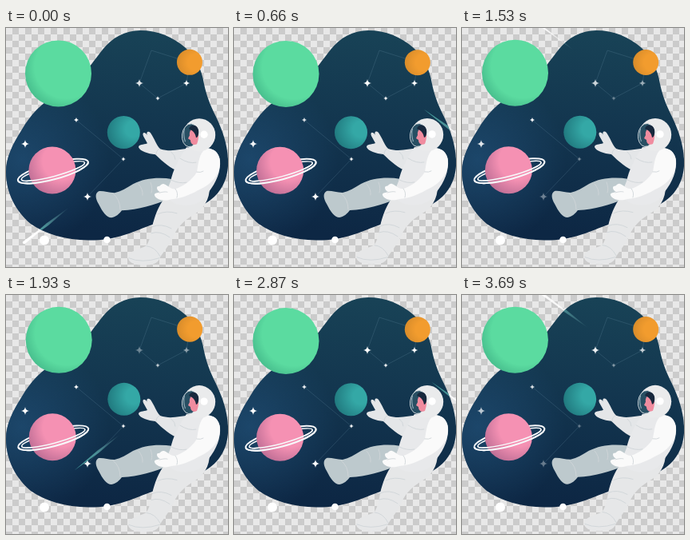
Animation of 278x299 px, one loop 3.76 s. Source, as an HTML page:

```html
<!DOCTYPE html>
<html lang="en">
<head>
<meta charset="utf-8">
<title>Floating astronaut</title>
<style>
html, body { margin: 0; width: 100%; height: 100%; overflow: hidden; }
body { background: repeating-conic-gradient(#cbcbcb 0 25%, #e8e8e8 0 50%) 0 0 / 16px 16px; }
svg { display: block; width: 278px; height: 299px; }
.fold { fill: none; stroke: #d0d5d9; stroke-width: .9; stroke-linecap: round; }
.ring { fill: none; stroke: #f7f8fa; }
.lines { fill: none; stroke: #7fa6bd; stroke-width: .6; opacity: .32; }
</style>
</head>
<body>
<svg viewBox="0 0 278 299">
  <defs>
    <path id="blob" d="M168 3C149 3 133 12 121 27C106 46 94 66 67 81C44 94 31 108 20 127C8 146 0 162 0 180C0 206 12 229 31 245C49 258 75 265 103 265.5C134 266 152 258 175 249C208 237 243 228 261 211C274 198 279 182 278 164C277 144 271 128 263 111C255 95 251 84 248 70C245 51 237 36 225 25C209 11 190 3 168 3Z"/>
    <clipPath id="inside"><use href="#blob"/></clipPath>
    <linearGradient id="night" gradientUnits="userSpaceOnUse" x1="190" y1="10" x2="160" y2="262">
      <stop offset="0" stop-color="#184256"/>
      <stop offset=".45" stop-color="#13364f"/>
      <stop offset="1" stop-color="#0d2744"/>
    </linearGradient>
    <radialGradient id="haze" gradientUnits="userSpaceOnUse" cx="20" cy="165" r="110">
      <stop offset="0" stop-color="#1f4c72" stop-opacity=".8"/>
      <stop offset="1" stop-color="#1f4c72" stop-opacity="0"/>
    </radialGradient>
    <radialGradient id="green" cx=".62" cy=".4" r=".68">
      <stop offset=".7" stop-color="#5bdba0"/><stop offset="1" stop-color="#45bb8b"/>
    </radialGradient>
    <radialGradient id="teal" cx=".8" cy=".4" r=".8">
      <stop offset=".3" stop-color="#34a8a6"/><stop offset="1" stop-color="#217b80"/>
    </radialGradient>
    <radialGradient id="pink" cx=".7" cy=".3" r=".8">
      <stop offset=".5" stop-color="#f591b3"/><stop offset="1" stop-color="#bd6d94"/>
    </radialGradient>
    <radialGradient id="orange" cx=".75" cy=".5" r=".8">
      <stop offset=".4" stop-color="#f29c2e"/><stop offset="1" stop-color="#d58a2a"/>
    </radialGradient>
    <linearGradient id="tealTail">
      <stop offset="0" stop-color="#3f9c9a"/>
      <stop offset=".45" stop-color="#5aa9a9" stop-opacity=".8"/>
      <stop offset="1" stop-color="#7fb9bc" stop-opacity="0"/>
    </linearGradient>
    <linearGradient id="whiteTail">
      <stop offset="0" stop-color="#fff"/>
      <stop offset=".5" stop-color="#fff" stop-opacity=".9"/>
      <stop offset="1" stop-color="#fff" stop-opacity="0"/>
    </linearGradient>
    <path id="glow" d="M0 0L40 -1.7L77 0L40 1.7Z" fill="url(#tealTail)"/>
    <path id="streak" d="M0 -1.8L77 0L0 1.8Q-2 0 0 -1.8Z" fill="url(#whiteTail)"/>
    <path id="star" d="M0 -5Q.6 -.6 5 0Q.6 .6 0 5Q-.6 .6 -5 0Q-.6 -.6 0 -5Z" fill="#fff"/>
  </defs>

  <use class="rise" href="#streak"/>
  <use class="fall" href="#streak"/>
  <use href="#blob" fill="url(#night)"/>
  <use href="#blob" fill="url(#haze)"/>
  <circle cx="48" cy="265.5" r="6" fill="#fff"/>
  <circle cx="126.5" cy="265" r="4.3" fill="#fff"/>

  <g class="lines">
    <path d="M167 69L182 28L230 43L226 69L190 88Z"/>
    <path d="M88 115L147 164L102 211"/>
  </g>
  <g id="stars"></g>
  <g clip-path="url(#inside)">
    <use class="rise" href="#glow"/>
    <use class="fall" href="#glow"/>
  </g>

  <circle id="big" cx="65.7" cy="56.8" r="41.5" fill="url(#green)"/>
  <circle id="amber" cx="230" cy="43" r="16" fill="url(#orange)"/>
  <circle id="mid" cx="147.2" cy="130.5" r="20.5" fill="url(#teal)"/>
  <g id="ringed">
    <g class="ring" transform="translate(59 179) rotate(-15)">
      <ellipse rx="45.5" ry="10.3" stroke-width="2"/>
      <ellipse rx="41" ry="6.6" stroke-width="1.5"/>
    </g>
    <circle cx="58" cy="178" r="29.5" fill="url(#pink)"/>
    <g class="ring" transform="translate(59 179) rotate(-15)">
      <path d="M-45.5 0A45.5 10.3 0 0 0 45.5 0" stroke-width="2"/>
      <path d="M-41 0A41 6.6 0 0 0 41 0" stroke-width="1.5"/>
    </g>
  </g>

  <g id="astronaut">
    <path d="M209 189C190 186 173 188 159 195C151 200 144 204 136 206C128 206 121 203 116 204C111 207 112 213 116 220C121 230 126 237 132 237C138 236 142 232 145 228C166 227 186 221 203 214Z" fill="#bdc9cd"/>
    <path class="fold" d="M134 207Q143 214 143 227M166 195Q172 202 171 209M181 193Q184 201 182 206" stroke="#a5b4bb"/>
    <path d="M232 151C220 150 208 156 193 151C188 146 186 138 181 131C178 128 175 130 177 134C174 129 170 130 172 135L177 144C172 146 166 145 166 149C168 154 178 157 187 158C196 167 207 176 216 179L232 174Z" fill="#e4e6e8"/>
    <path class="fold" d="M192 151Q188 153 188 158M207 155Q212 159 212 164"/>
    <g id="leg">
      <path d="M199 212C191 221 186 235 183 248C181 260 179 268 175 272C167 276 155 278 153 285C152 292 160 296 172 296C185 296 191 293 193 286C199 277 205 270 209 261C214 249 222 241 233 234C248 226 255 214 255 198Z" fill="#e6e7e8"/>
      <path class="fold" d="M176 272Q187 273 193 285M183 248Q194 243 207 250M182 256Q192 252 205 261M190 232Q201 227 214 231M154 287Q170 294 192 287"/>
    </g>
    <path d="M226 149C216 163 209 178 206 192C201 203 199 212 209 218C224 226 246 221 253 206C264 192 269 179 268 165C266 153 255 148 245 150Z" fill="#e8e9eb"/>
    <path class="fold" d="M218 163Q229 170 238 168M207 190Q217 195 226 193"/>
    <path d="M250 151C262 149 269 158 268 171C266 187 254 197 240 203C230 209 218 213 207 214C199 217 188 215 186 209C185 206 190 206 193 205C189 203 188 199 190 198C194 198 194 194 198 195C203 197 207 202 212 201C222 198 233 190 239 180C241 168 242 156 250 151Z" fill="#fafafa"/>
    <path class="fold" d="M212 201Q216 206 214 212M192 206Q199 204 202 205M239 180Q244 181 247 179"/>
    <ellipse cx="242" cy="133.5" rx="20.2" ry="20.5" fill="#eaebec"/>
    <ellipse cx="230.5" cy="134" rx="10" ry="14.5" transform="rotate(7 230.5 134)" fill="#284f63" stroke="#e6eaec" stroke-width=".8"/>
    <path d="M238 123C233 124 229 129 230 134L228 138L231 140C231 145 235 147 239 145C242 138 242 129 238 123Z" fill="#f08c9f"/>
    <path d="M229 126C231 120 239 120 241 127C242 133 240 137 238 137C237 131 234 128 229 126Z" fill="#17283d"/>
    <path d="M223.500 126Q221.500 134 224.500 142" fill="none" stroke="#8ea8b6" stroke-width="1.2"/>
    <circle cx="248" cy="133" r="4.7" fill="#fff"/>
  </g>
</svg>
<script>
const LOOP = 3760, CYCLE = 2260;
const $ = id => document.getElementById(id);

// x, y, size, time of the dimmest moment
const stars = [
  [24, 145, 1, 1130], [88, 115, .6, 1050], [102, 211, 1, 1450], [147, 164, .55, 1400],
  [167, 69, 1, 1870], [226, 69, .85, 1750], [190, 88, .55, 1600]
].map(([x, y, size, dim]) => {
  const el = document.createElementNS("http://www.w3.org/2000/svg", "use");
  el.setAttribute("href", "#star");
  el.setAttribute("transform", `translate(${x} ${y}) scale(${size})`);
  $("stars").append(el);
  return { el, dim };
});

// Meteor keys: time, head x, head y, opacity, tail length
const meteors = [
  { name: "rise", angle: 36.5, shift: 0, keys: [
    [430, 280, 133, .9, 1], [660, 238, 102, 1, 1], [1060, 165, 47, .9, 1],
    [1430, 97, -4, .9, 1], [1720, 43, -44, .9, 1]] },
  { name: "fall", angle: -38, shift: 570, keys: [
    [60, 119, 194, 0, .6], [130, 106, 204, .9, .8], [240, 86, 219, 1, .95], [570, 22, 269, 1, .95],
    [850, 18, 270, .75, .75], [1100, 14, 273, .25, .4], [1170, 14, 273, 0, .3]] }
].map(m => ({ ...m, parts: document.querySelectorAll("." + m.name) }));

const wave = (t, peak) => Math.cos((t - peak) / CYCLE * 2 * Math.PI);
const move = (id, x, y) => $(id).setAttribute("transform", `translate(${x} ${y})`);

function sample(keys, t) {
  const i = keys.findIndex(k => k[0] > t);
  if (i < 1) return null;
  const a = keys[i - 1], b = keys[i], f = (t - a[0]) / (b[0] - a[0]);
  return a.slice(1).map((v, n) => v + (b[n + 1] - v) * f);
}

function draw(now) {
  const t = now % LOOP;
  move("big", .8 * wave(t, 1600), .7 * wave(t, 500));
  move("mid", .7 * wave(t, 1750), .2 * wave(t, 500));
  move("ringed", .4 * wave(t, 1600), .3 * wave(t, 500));
  move("amber", .2 * wave(t, 1600), .2 * wave(t, 900));
  move("astronaut", 0, .2 * wave(t, 0));
  move("leg", 0, .6 * wave(t, 0));

  for (const { el, dim } of stars) el.style.opacity = 1 - .65 * Math.max(0, wave(t, dim)) ** 2;

  for (const { keys, angle, shift, parts } of meteors) {
    const pose = sample(keys, (t + shift) % CYCLE);
    for (const el of parts) {
      el.style.opacity = pose ? pose[2] : 0;
      if (pose) el.setAttribute("transform",
        `translate(${pose[0]} ${pose[1]}) rotate(${angle}) scale(${pose[3]} 1)`);
    }
  }
}

const start = performance.now();
function tick() {
  draw(performance.now() - start);
  requestAnimationFrame(tick);
}
tick();
</script>
</body>
</html>
```
